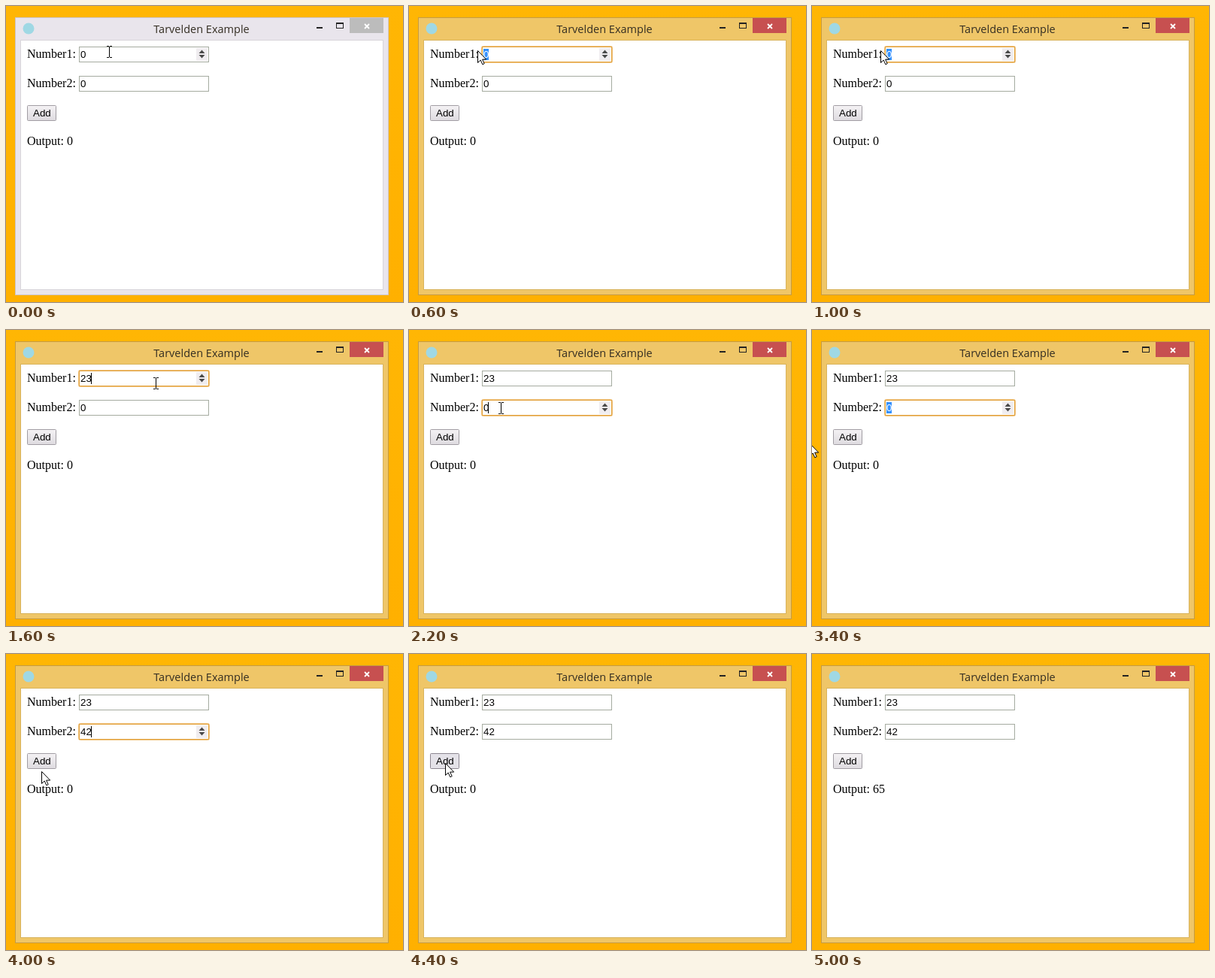
Write an HTML page that moves like this. It is 528 by 394 pixels and loops after 7.2 s.

```html
<!DOCTYPE html>
<html lang="en">
<head>
<meta charset="utf-8">
<title>Adder</title>
<style>
  html, body { margin: 0; width: 100%; height: 100%; overflow: hidden; }
  body { background: linear-gradient(#ffb604, #ffb000); }
  svg { display: block; }
  text { white-space: pre; }
  .title { font: 14.5px "Open Sans", "Noto Sans", sans-serif; text-anchor: middle; }
  .label { font: 16px "Liberation Serif", "Times New Roman", serif; }
  .value { font: 13.33px "Liberation Sans", Arial, sans-serif; }
</style>
</head>
<body>
<svg id="stage" width="528" height="394" viewBox="0 0 528 394"></svg>
<script>
const LOOP = 7200;

// Each step changes only the listed properties of the step before it.
const steps = [
  [0, { active: false, focus: 0, mode: '', values: ['0', '0'], sum: 0, pointer: 'beam', x: 137, y: 61 }],
  [200, { active: true, focus: 1, mode: 'caret' }],
  [400, { x: 113, y: 60 }],
  [600, { mode: 'select', pointer: 'arrow', x: 91, y: 59 }],
  [1400, { mode: 'caret', values: ['2', '0'], pointer: 'beam', x: 150, y: 66 }],
  [1600, { values: ['23', '0'], x: 199, y: 71 }],
  [1800, { x: 182, y: 94 }],
  [2000, { x: 140, y: 104 }],
  [2200, { focus: 2, x: 122, y: 104 }],
  [2400, { mode: 'select', pointer: 'arrow', x: 70, y: 101 }],
  [2600, { x: -5, y: 132 }],
  [2800, { x: -4, y: 152 }],
  [3400, { x: -3, y: 151 }],
  [3600, { mode: 'caret', values: ['23', '42'], x: 58, y: 168 }],
  [3800, { x: 46, y: 168 }],
  [4000, { x: 47, y: 156 }],
  [4200, { mode: '', x: 48, y: 146 }],
  [4400, { focus: 0, x: 48, y: 145 }],
  [4600, { sum: 65 }],
  [4800, { x: 89, y: 267 }],
  [5000, { pointer: '' }]
];

const rect = (x, y, w, h, fill, more = '') =>
  `<rect x="${x}" y="${y}" width="${w}" height="${h}" fill="${fill}" ${more}/>`;
const box = (x, y, w, h, fill, stroke, more = '') =>
  rect(x + .5, y + .5, w - 1, h - 1, fill, `stroke="${stroke}" ${more}`);
const text = (kind, x, y, str, fill = '#000') =>
  `<text class="${kind}" x="${x}" y="${y}" fill="${fill}">${str}</text>`;
const path = (d, more = '') => `<path d="${d}" ${more}/>`;

function frame({ active }) {
  const [fill, edge, line, close] = active
    ? ['#efc668', '#c49b43', '#d8b35c', '#c75050']
    : ['#e9e5ec', '#cdc5ca', '#d8d5da', '#bcbcbc'];
  return box(12, 15, 497, 370, fill, edge) +
    box(19, 45, 483, 333, '#fff', line) +
    '<circle cx="30" cy="30" r="7.5" fill="#9fd8e4"/>' +
    text('title', 260, 36, 'Tarvelden Example', '#332d22') +
    rect(413, 28, 8, 2, '#222') +
    path('M439 22h10v8h-10zM440 24v5h8v-5z', 'fill="#222" fill-rule="evenodd"') +
    rect(457, 16, 45, 20, close) +
    path('M477 24l6 6m0-6l-6 6', 'stroke="#fff" stroke-width="1.8"');
}

function field(s, n) {
  const y = n === 1 ? 54 : 93;
  const value = s.values[n - 1];
  const focused = s.focus === n;
  const hovered = s.pointer === 'beam' && s.y >= y && s.y < y + 21;
  const selected = focused && s.mode === 'select';
  let out = text('label', 28, y + 15, `Number${n}: `) + box(97, y, 173, 21, '#fff', '#a5aba0');
  if (focused) {
    out += box(96, y - 1, 175, 23, 'none', '#efc27c', 'rx="2"') +
      box(97, y, 173, 21, 'none', '#e2a13c');
  }
  if (focused || hovered) {
    out += rect(253, y + 2, 15, 17, '#f0edf0') +
      path(`M256.5 ${y + 9}h8l-4 -4.5zM256.5 ${y + 11}h8l-4 4.5z`, 'fill="#494949"');
  }
  if (selected) out += rect(99, y + 3, 7, 15, '#3390ff');
  out += text('value', 99, y + 15, value, selected ? '#fff' : '#000');
  if (focused && s.mode === 'caret') out += rect(98 + Math.round(value.length * 7.42), y + 3, 1, 15, '#000');
  return out;
}

function button({ pointer, x, y }) {
  const hot = pointer === 'arrow' && x >= 28 && x < 67 && y >= 132 && y < 153;
  return box(28, 132, 39, 21, hot ? '#e4e2e8' : 'url(#face)', hot ? '#8c8690' : '#a19da3', 'rx="1"') +
    text('value', 36, 147, 'Add');
}

function cursor({ pointer, x, y }) {
  const shapes = {
    beam: path('M-3 -7.5h3m1 0h3M.5 -7v14M-3 7.5h3m1 0h3', 'fill="none" stroke="#000"'),
    arrow: path('M.5 .5v16l3.7 -3.5 2.6 5.8 2.4 -1.1 -2.6 -5.6h5.1z', 'fill="#fff" stroke="#000"')
  };
  return pointer ? `<g transform="translate(${x} ${y})">${shapes[pointer]}</g>` : '';
}

const defs = '<defs><linearGradient id="face" x2="0" y2="1">' +
  '<stop stop-color="#f4f2f4"/><stop offset="1" stop-color="#dedbe0"/></linearGradient></defs>';

const draw = s => defs + frame(s) + field(s, 1) + field(s, 2) + button(s) +
  text('label', 28, 185, `Output: ${s.sum}`) + cursor(s);

const stage = document.getElementById('stage');
const start = performance.now();
let shown = 0;

function tick() {
  const t = (performance.now() - start) % LOOP;
  const past = steps.filter(([at]) => at <= t);
  if (past.length !== shown) {
    shown = past.length;
    stage.innerHTML = draw(Object.assign({}, ...past.map(([, change]) => change)));
  }
  requestAnimationFrame(tick);
}
tick();
</script>
</body>
</html>
```
